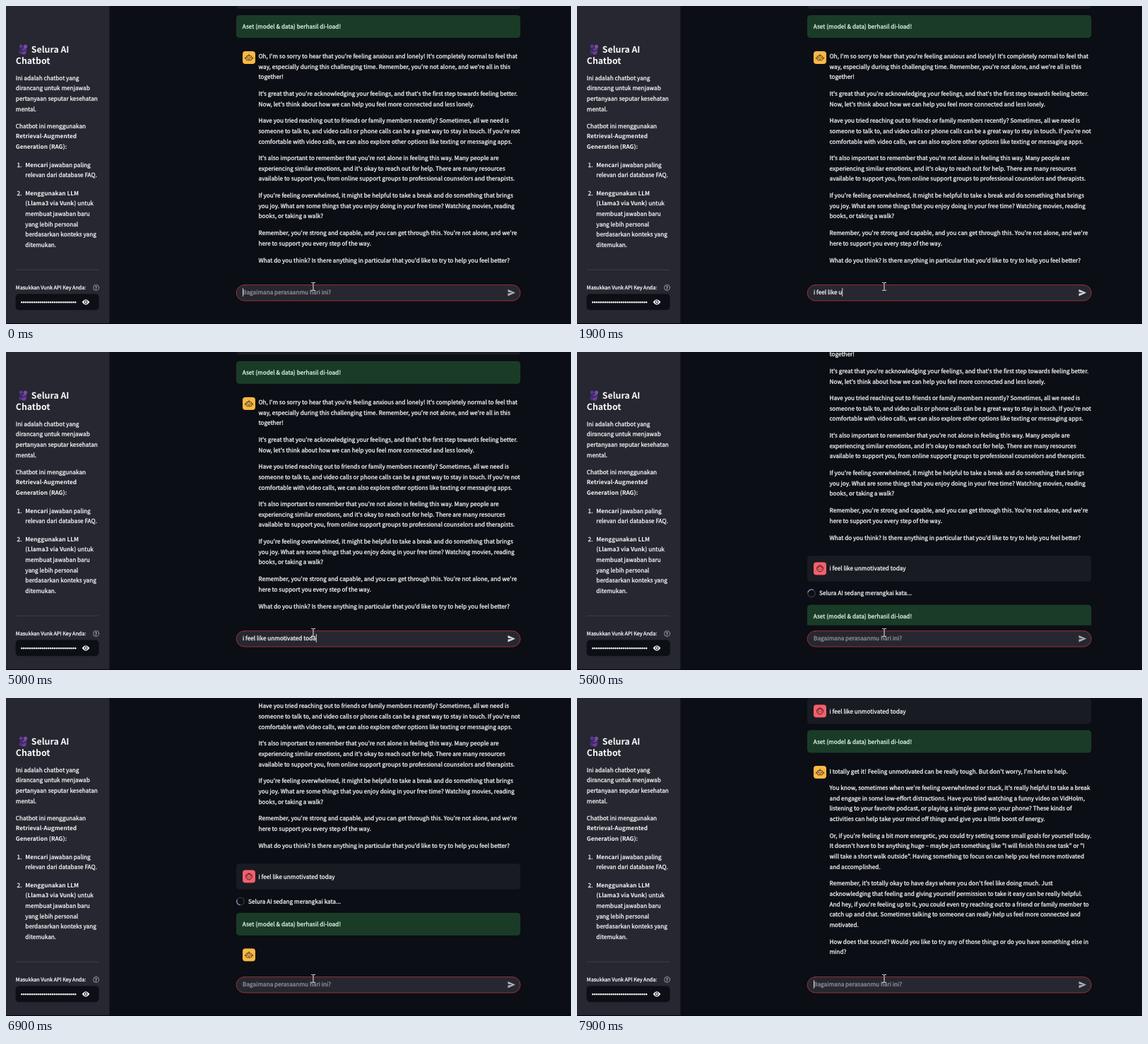
An HTML page with a canvas that plays this animation: 800x450 px, repeating every 8000 ms.

```html
<!DOCTYPE html>
<html lang="id">
<head>
<meta charset="utf-8">
<title>Chatbot</title>
<style>
html, body { margin: 0; width: 100%; height: 100%; overflow: hidden; background: #0b0e14; }
canvas { display: block; width: 800px; height: 450px; }
</style>
</head>
<body>
<canvas id="stage" width="800" height="450"></canvas>
<script>
const ctx = document.getElementById('stage').getContext('2d');
const LOOP = 8000, STEP = 100;
const BG = '#0b0e14', SIDE = '#262730', WHITE = '#f8f8f9';
const FAMILY = '"Noto Sans CJK JP", "Noto Sans CJK SC", "Noto Sans CJK KR", "Noto Sans CJK", "Noto Sans", sans-serif';
const BODY = 9.1, LINE = 14.61, GAP = 9.13;
const MESSAGE = 'i feel like unmotivated today';

const FIRST = [
  ["Oh, I'm so sorry to hear that you're feeling anxious and lonely! It's completely normal to feel that",
   "way, especially during this challenging time. Remember, you're not alone, and we're all in this",
   "together!"],
  ["It's great that you're acknowledging your feelings, and that's the first step towards feeling better.",
   "Now, let's think about how we can help you feel more connected and less lonely."],
  ["Have you tried reaching out to friends or family members recently? Sometimes, all we need is",
   "someone to talk to, and video calls or phone calls can be a great way to stay in touch. If you're not",
   "comfortable with video calls, we can also explore other options like texting or messaging apps."],
  ["It's also important to remember that you're not alone in feeling this way. Many people are",
   "experiencing similar emotions, and it's okay to reach out for help. There are many resources",
   "available to support you, from online support groups to professional counselors and therapists."],
  ["If you're feeling overwhelmed, it might be helpful to take a break and do something that brings",
   "you joy. What are some things that you enjoy doing in your free time? Watching movies, reading",
   "books, or taking a walk?"],
  ["Remember, you're strong and capable, and you can get through this. You're not alone, and we're",
   "here to support you every step of the way."],
  ["What do you think? Is there anything in particular that you'd like to try to help you feel better?"]
];

const SECOND = [
  ["I totally get it! Feeling unmotivated can be really tough. But don't worry, I'm here to help."],
  ["You know, sometimes when we're feeling overwhelmed or stuck, it's really helpful to take a break",
   "and engage in some low-effort distractions. Have you tried watching a funny video on VidHolm,",
   "listening to your favorite podcast, or playing a simple game on your phone? These kinds of",
   "activities can help take your mind off things and give you a little boost of energy."],
  ["Or, if you're feeling a bit more energetic, you could try setting some small goals for yourself today.",
   "It doesn't have to be anything huge \u2013 maybe just something like \"I will finish this one task\" or \"I",
   "will take a short walk outside\". Having something to focus on can help you feel more motivated",
   "and accomplished."],
  ["Remember, it's totally okay to have days where you don't feel like doing much. Just",
   "acknowledging that feeling and giving yourself permission to take it easy can be really helpful.",
   "And hey, if you're feeling up to it, you could even try reaching out to a friend or family member to",
   "catch up and chat. Sometimes talking to someone can really help us feel more connected and",
   "motivated."],
  ["How does that sound? Would you like to try any of those things or do you have something else in",
   "mind?"]
];

// [time, characters typed so far]
const KEYS = [
  [400, 1], [600, 2], [800, 3], [1100, 6], [1300, 9], [1400, 11], [1600, 12], [1900, 13],
  [2400, 14], [2500, 15], [2600, 16], [2800, 17], [2900, 18], [3000, 19], [3100, 20],
  [3200, 21], [3300, 22], [3400, 23], [3600, 24], [3700, 25], [3900, 26], [4200, 27],
  [4600, 28], [5200, 29]
];
const SUBMIT = 5400, AVATAR = 6700, ANSWER = 7100;

ctx.textRendering = 'geometricPrecision';
ctx.lineJoin = ctx.lineCap = 'round';

// Nominal text size to pixels for the font in use
ctx.font = '100px ' + FAMILY;
const FIT = 1189 / ctx.measureText(MESSAGE).width;

// y is the middle of the capitals; returns the end of the text
function text(str, x, y, { size = BODY, color = WHITE, weight = 400 } = {}) {
  ctx.font = `${weight} ${size * FIT}px ${FAMILY}`;
  ctx.fillStyle = ctx.strokeStyle = color;
  const base = y + size * 0.33;
  ctx.fillText(str, x, base);
  if (weight < 600) {
    ctx.lineWidth = 0.28;
    ctx.strokeText(str, x, base);
  }
  return x + ctx.measureText(str).width;
}

function box(x, y, w, h, r, fill, stroke) {
  ctx.beginPath();
  ctx.roundRect(x, y, w, h, r);
  if (fill) { ctx.fillStyle = fill; ctx.fill(); }
  if (stroke) { ctx.strokeStyle = stroke; ctx.lineWidth = 0.8; ctx.stroke(); }
}

function dot(x, y, r, color) {
  ctx.fillStyle = color;
  ctx.beginPath();
  ctx.arc(x, y, r, 0, 7);
  ctx.fill();
}

function ring(x, y, r, color, width, from = 0, to = Math.PI * 2) {
  ctx.strokeStyle = color;
  ctx.lineWidth = width;
  ctx.beginPath();
  ctx.arc(x, y, r, from, to);
  ctx.stroke();
}

function path(points, color, width) {
  ctx.strokeStyle = color;
  ctx.lineWidth = width;
  ctx.beginPath();
  points.forEach(([x, y]) => ctx.lineTo(x, y));
  ctx.stroke();
}

const clamp = v => Math.min(1, Math.max(0, v));
const easeOut = (t, start, span) => 1 - (1 - clamp((t - start) / span)) ** 3;

function botIcon(y) {
  const x = 344, ink = '#2b2414';
  box(335, y - 9, 18, 18, 4, '#fbb845');
  box(x - 3.8, y - 2.4, 7.6, 6.2, 1.4, null, ink);
  path([[x, y - 4.6], [x, y - 2.6]], ink, 1);
  path([[x - 5.2, y - 0.2], [x - 5.2, y + 1.6]], ink, 1);
  path([[x + 5.2, y - 0.2], [x + 5.2, y + 1.6]], ink, 1);
  dot(x - 1.6, y, 0.8, ink);
  dot(x + 1.6, y, 0.8, ink);
  path([[x - 1.5, y + 2], [x + 1.5, y + 2]], ink, 0.7);
}

function userIcon(y) {
  const x = 344, ink = '#401a22';
  box(335, y - 9, 18, 18, 4, '#f4606c');
  ring(x, y, 4.4, ink, 1);
  path([[x - 4, y - 0.8], [x - 1.2, y - 2.2], [x, y - 3.8], [x + 1.6, y - 2], [x + 4, y - 1.5]], ink, 0.9);
  dot(x - 1.5, y + 0.9, 0.65, ink);
  dot(x + 1.5, y + 0.9, 0.65, ink);
}

function paragraphs(list, y) {
  for (const para of list) {
    for (const row of para) {
      if (y > -10 && y < 400) text(row, 357.5, y);
      y += LINE;
    }
    y += GAP;
  }
}

function success(y) {
  box(326, y - 16, 402.3, 32, 4.6, '#1a3c27');
  text('Aset (model & data) berhasil di-load!', 334.8, y, { color: '#e6f7ea' });
}

function userMessage(y) {
  box(326, y - 18.2, 402.3, 36.4, 4.6, '#191b23');
  userIcon(y);
  text(MESSAGE, 357.5, y);
}

function spinner(y, t) {
  const a = (t - 6900) / 750 * Math.PI * 2 + 2.6;
  ring(332, y, 5.3, '#343640', 1.3);
  ring(332, y, 5.3, '#8d89bd', 1.3, a - 0.85, a + 0.85);
  text('Selura AI sedang merangkai kata...', 343, y);
}

function chat(t) {
  let scroll = 110.9 * easeOut(t, SUBMIT, 400) + 40 * easeOut(t, AVATAR - 100, 200);
  const answered = t >= ANSWER;
  // Removing the spinner row pulls the page up while it scrolls to the end
  if (answered) scroll = 175.3 + 209.7 * easeOut(t, ANSWER - 5, 505);

  ctx.save();
  ctx.beginPath();
  ctx.rect(146, 0, 654, 386.8);
  ctx.clip();
  box(326, -33 - scroll, 402.3, 37, 4.6, '#191b23');
  success(29 - scroll);
  botIcon(73 - scroll);
  paragraphs(FIRST, 71 - scroll);
  if (t >= SUBMIT) {
    const user = 403.5 - scroll;
    userMessage(user);
    if (!answered) spinner(user + 35, t);
    const done = user + (answered ? 43 : 67.4);
    success(done);
    if (t >= AVATAR) botIcon(done + 43.6);
    if (answered) paragraphs(SECOND, done + 42);
  }
  ctx.restore();
}

function typedCount(t) {
  if (t >= SUBMIT) return 0;
  let n = 0;
  for (const [at, count] of KEYS) if (t >= at) n = count;
  return n;
}

function inputBar(t) {
  const y = 405.2, n = typedCount(t);
  box(326.2, 394.7, 402, 22.4, 11.2, SIDE, '#b53842');
  let caret = 335;
  if (n) caret = text(MESSAGE.slice(0, n), 335, y);
  else text('Bagaimana perasaanmu hari ini?', 335, y, { color: '#94959b' });

  // Steady while typing, then blinking
  if (t < SUBMIT || (t - SUBMIT + 150) % 600 < 300) {
    ctx.fillStyle = '#e4e4e6';
    ctx.fillRect(caret, 399.2, 0.9, 11.8);
  }

  ctx.fillStyle = n ? '#d9d9dc' : '#aeafb4';
  ctx.beginPath();
  [[710.6, 401], [721.2, 405.7], [710.6, 410.4], [710.6, 406.8], [717, 405.7], [710.6, 404.6]]
    .forEach(([px, py]) => ctx.lineTo(px, py));
  ctx.fill();

  path([[432.3, 391.5], [434.2, 391.5], [435, 392.2], [435.8, 391.5], [437.7, 391.5]], '#e8e8ea', 0.9);
  path([[435, 392], [435, 402]], '#e8e8ea', 1);
  path([[432.3, 402.5], [434.2, 402.5], [435, 401.8], [435.8, 402.5], [437.7, 402.5]], '#e8e8ea', 0.9);
}

// Two leaning figures in an embrace
function hug() {
  ctx.save();
  ctx.translate(24, 62);
  ctx.rotate(0.16);
  box(-5, -1.5, 6, 8, 2.6, '#4d2d78');
  box(-1, -2.5, 6, 9, 2.6, '#6a3f9a');
  dot(-3.4, -4.4, 2.5, '#5f3790');
  dot(2.6, -5, 2.7, '#7c49ac');
  path([[-4, 0.8], [0, 2], [4, 0]], '#35205a', 1.4);
  ctx.restore();
}

function sidebar() {
  const bold = { weight: 700 };
  ctx.fillStyle = SIDE;
  ctx.fillRect(0, 0, 146.5, 449);

  hug();
  text('Selura AI', 35.8, 61.2, { size: 13.65, weight: 700 });
  text('Chatbot', 13.8, 77.8, { size: 13.65, weight: 700 });

  ['Ini adalah chatbot yang', 'dirancang untuk menjawab', 'pertanyaan seputar kesehatan', 'mental.']
    .forEach((s, i) => text(s, 13.8, 101.7 + i * LINE));
  text('Chatbot ini menggunakan', 13.8, 169.6);
  text('Retrieval-Augmented', 13.8, 184.2, bold);
  text('Generation (RAG):', 13.8, 198.8, bold);

  text('1.', 15.6, 224.6);
  const a = text('Mencari', 27.3, 224.6, bold);
  text(' jawaban paling', a, 224.6);
  text('relevan dari database FAQ.', 27.3, 239.2);

  text('2.', 15.6, 264.8);
  text('Menggunakan LLM', 27.3, 264.8, bold);
  const b = text('(Llama3 via Vunk)', 27.3, 279.4, bold);
  text(' untuk', b, 279.4);
  ['membuat jawaban baru', 'yang lebih personal', 'berdasarkan konteks yang', 'ditemukan.']
    .forEach((s, i) => text(s, 27.3, 294 + i * LINE));

  path([[14, 373.3], [131, 373.3]], '#44454d', 0.8);
  text('Masukkan Vunk API Key Anda:', 13.8, 398.6, { size: 7.96 });
  ring(127.6, 398.5, 4, '#b5b6bb', 0.8);
  text('?', 126.1, 398.5, { size: 6.6, color: '#c8c9cd' });

  box(13.6, 407.6, 118, 22.6, 4.6, '#0c0f15');
  for (let i = 0; i < 27; i++) dot(22.3 + i * 2.92, 419.2, 1.2, WHITE);
  ctx.fillStyle = WHITE;
  ctx.beginPath();
  ctx.moveTo(107.6, 419);
  ctx.quadraticCurveTo(113, 411.6, 118.4, 419);
  ctx.quadraticCurveTo(113, 426.4, 107.6, 419);
  ctx.fill();
  dot(113, 419, 2.4, '#0c0f15');
  dot(113, 419, 1.4, WHITE);
}

function draw(t) {
  ctx.fillStyle = BG;
  ctx.fillRect(0, 0, 800, 450);
  chat(t);
  inputBar(t);
  sidebar();
  ctx.fillStyle = '#030406';
  ctx.fillRect(0, 449, 800, 1);
}

function tick(now) {
  draw(Math.floor((now % LOOP) / STEP) * STEP);
  requestAnimationFrame(tick);
}
draw(0);
requestAnimationFrame(tick);
</script>
</body>
</html>
```
